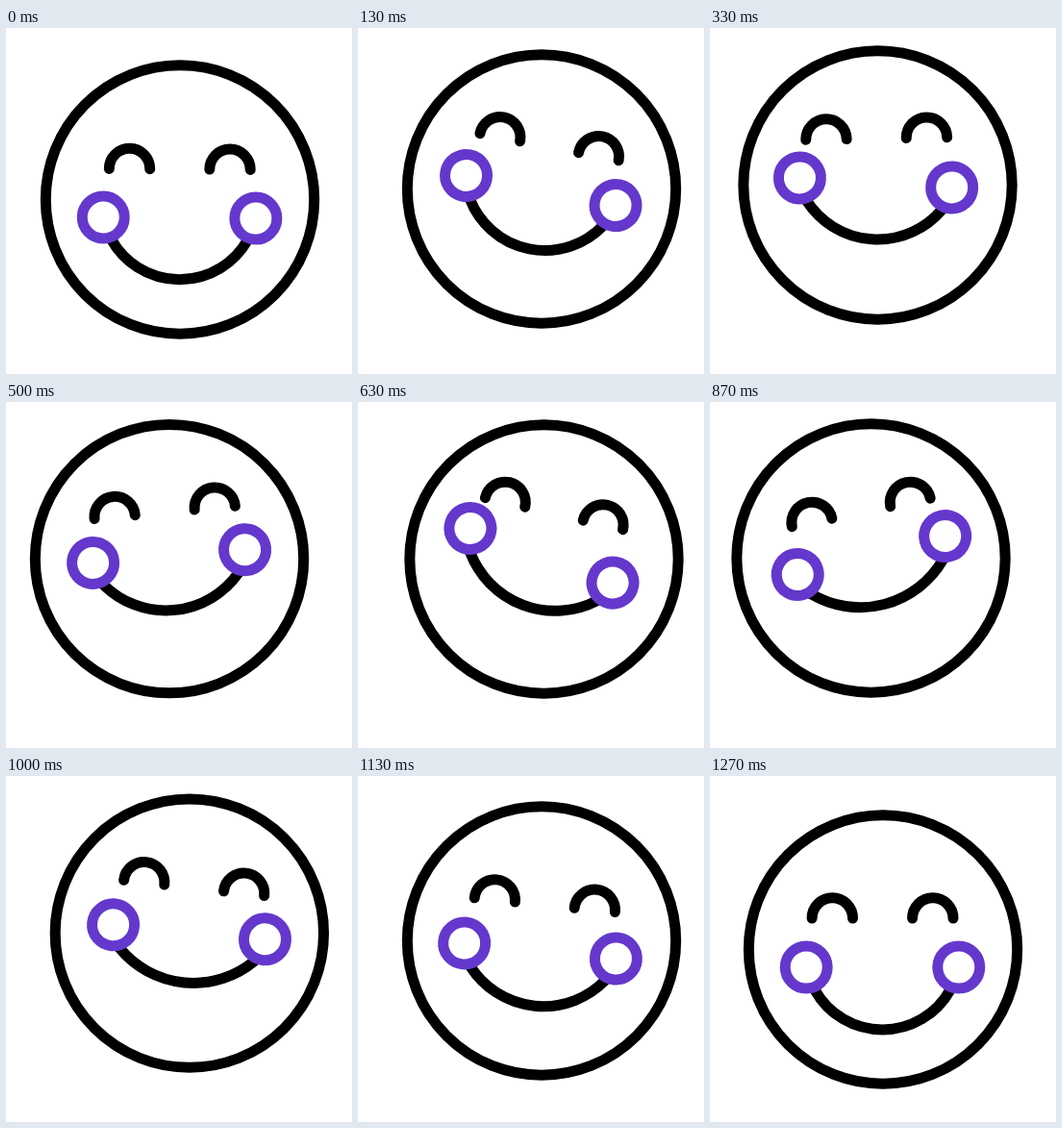
An HTML page for the animation above (1.67 s loop, 360 px wide and 360 px high).

```html
<!DOCTYPE html>
<html lang="en">
<head>
<meta charset="utf-8">
<title>Happy face</title>
<style>
  html, body { margin: 0; width: 100%; height: 100%; overflow: hidden; background: #fff; }
  svg { display: block; width: 100%; height: 100%; }
  svg * { stroke: #000; stroke-width: 11; stroke-linecap: round; fill: none; }
  #cheeks circle { stroke: #6438cc; fill: #fff; }
</style>
</head>
<body>
<svg viewBox="0 0 360 360">
  <g id="head">
    <circle r="139.7"/>
    <g id="eyes">
      <path d="M-73.5 0a21.2 21.2 0 0 1 42.4 0M31 0a21.2 21.2 0 0 1 42.4 0"/>
    </g>
    <g id="cheeks">
      <path id="mouth"/>
      <circle cx="-79.3" r="22"/>
      <circle cx="79.3" r="22"/>
    </g>
  </g>
</svg>
<script>
const LOOP = 1670, LAST = 38;

// Key steps at 30 per second, then one row of values per moving part
const keys = [0, 4, 6, 10, 13, 19, 25, 26, 32, 34, 38];
const tracks = {
  x:        [181, 191, 192.6, 174.5, 161.8, 193.5, 165.8, 167.5, 197.5, 191, 180],
  y:        [178.5, 167.5, 165, 163.5, 163, 163.5, 162, 162.5, 164.5, 171.5, 180.5],
  eyeTurn:  [0.4, 11, 13, -1, -11.5, 13, -12.2, -11.6, 12, 5.7, 0],
  eyeY:     [-31.6, -44.5, -46.5, -48.5, -48.5, -48.5, -48.7, -48.7, -46, -37.5, -32.5],
  faceTurn: [0.4, 11.3, 15, 3.6, -14, 20.9, -15, -14.6, 12, 5.8, 0],
  faceX:    [-0.3, -0.4, -1.5, -2.1, 1, -3.7, 1.2, 1.2, -1, -0.4, -0.5],
  faceY:    [19, 1.6, -1.2, -2.4, -2.6, -2.6, -2.8, -2.8, 0.5, 10.6, 18.5],
  smile:    [64.2, 62, 61, 59, 57, 55, 52.9, 52.7, 53, 57.5, 65]
};

// Smooth curve through the keys that never overshoots them
function curve(v) {
  const rise = keys.slice(1).map((k, i) => (v[i + 1] - v[i]) / (k - keys[i]));
  const slope = v.map((_, i) => {
    if (i === 0) return rise[0];
    if (i === rise.length) return 0;
    const a = rise[i - 1], b = rise[i];
    return a * b > 0 ? 2 * a * b / (a + b) : 0;
  });
  return n => {
    let i = 0;
    while (i < rise.length - 1 && n >= keys[i + 1]) i++;
    const w = keys[i + 1] - keys[i], p = (n - keys[i]) / w, q = 1 - p;
    return v[i] * q * q * (1 + 2 * p) + v[i + 1] * p * p * (3 - 2 * p)
      + w * p * q * (slope[i] * q - slope[i + 1] * p);
  };
}

const curves = Object.entries(tracks).map(([name, v]) => [name, curve(v)]);
const part = id => document.getElementById(id);
const head = part("head"), eyes = part("eyes"), cheeks = part("cheeks"), mouth = part("mouth");
const place = (el, turn, x, y) =>
  el.setAttribute("transform", `rotate(${turn}) translate(${x} ${y})`);

function draw(n) {
  const p = Object.fromEntries(curves.map(([name, f]) => [name, f(n)]));
  place(head, 0, p.x, p.y);
  place(eyes, p.eyeTurn, -0.4, p.eyeY);
  place(cheeks, p.faceTurn, p.faceX, p.faceY);
  // Arc from cheek to cheek, flatter as the smile gets shallower
  const half = 70.5, top = 23.5, sag = p.smile - top;
  const r = (half * half + sag * sag) / (2 * sag);
  mouth.setAttribute("d", `M${-half} ${top}A${r} ${r} 0 0 0 ${half} ${top}`);
}

const start = performance.now();
function tick() {
  const t = (performance.now() - start) % LOOP;
  // Steps start on whole hundredths of a second
  draw(Math.min(LAST, Math.floor((Math.floor(t / 10) + 0.34) * 0.3)));
  requestAnimationFrame(tick);
}
tick();
</script>
</body>
</html>
```
